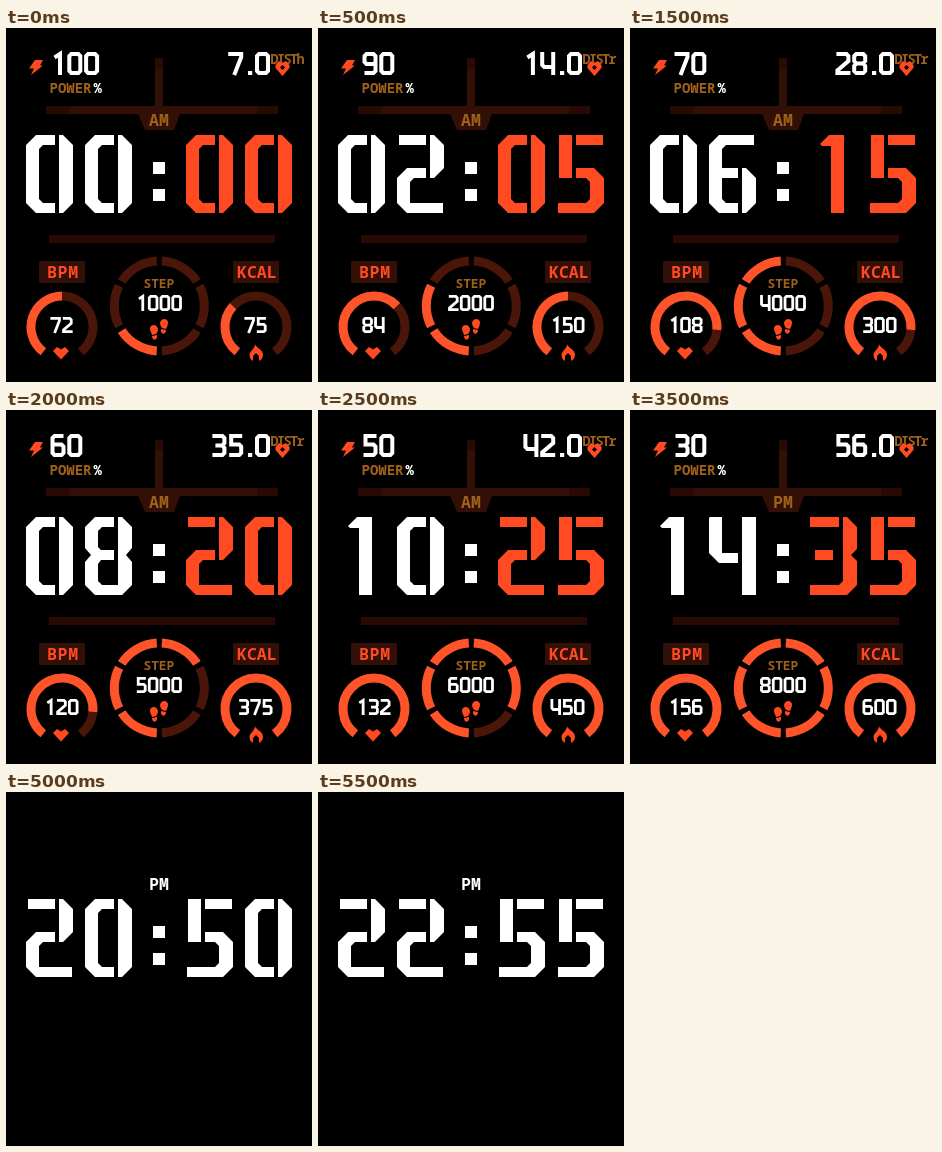
Write an HTML page that moves like this. It is 306 px wide and 354 px high and loops after 6000 ms.

```html
<!DOCTYPE html>
<html lang="en">
<head>
<meta charset="utf-8">
<title>Watch face</title>
<style>
  html, body { margin: 0; width: 100%; height: 100%; overflow: hidden; background: #000; }
  svg { display: block; width: 306px; height: 354px; }
  text { font-family: "Noto Sans Mono", "DejaVu Sans Mono", monospace; font-weight: 600; }
  .hot { fill: #ff4a22; }
  .gold { fill: #a0621a; }
  .bar { fill: #320f07; }
  .edge { fill: #280904; }
  .white { fill: #fff; }
  .arc { fill: none; stroke: #4a1609; }
  .arc.on { stroke: #ff5329; }
  .num { fill: none; stroke: #fff; stroke-width: 4; }
</style>
</head>
<body>
<svg viewBox="0 0 306 354">
  <rect width="306" height="354"/>
  <g id="full">
    <path class="bar" d="M149 30h8v48h115v8H174L168 102H139L132 86H40v-8h109zM33 233h46v22H33zM227 233h46v22H227z"/>
    <path class="edge" d="M40 78h24v8H40zM251 78h21v8H251zM149 30h8v10h-8zM43 207h226v8H43z"/>
    <g class="hot">
      <path d="M29 32H37L34 37.500H37L25 47L28 40.500H23Z"/>
      <text x="41" y="250" font-size="16.500" letter-spacing=".7">BPM</text>
      <text x="231" y="250" font-size="16.500">KCAL</text>
      <path d="M47 323L51 319L55 321.500L59 319L63 323L55 331.500Z"/>
      <path d="M249 316C250 320 257 321 257 327C257 330 255 332 253 333V328L250 325L247 328V333C245 332 243.500 330 243.500 327C243.500 323 249 321 249 316Z"/>
      <path d="M144 300c1-4 7-4 8 1 0 2-1 4-2 5l-4 1c-1-3-2-4-2-7zM146 308l5-1c1 6-5 6-5 1z"/>
      <path d="M154 295c1-5 7-5 8-1 0 3-1 5-2 7l-4-1c-1-2-2-3-2-5zM155 301l5 1c0 5-6 5-5-1z"/>
    </g>
    <text class="gold" x="43.500" y="65" font-size="14">POWER<tspan class="white" x="87.500">%</tspan></text>
    <text class="gold" x="137.500" y="260" font-size="12.800">STEP</text>
    <text class="gold" id="dist" x="264.500" y="36" font-size="13.500" letter-spacing="-1.600"></text>
    <path class="hot" fill-rule="evenodd" d="M269.500 37L273 33L276.500 35L280 33L283.500 37V40L276.500 48L269.500 40ZM276.500 37l-2.500 2.500 2.500 2.500 2.500-2.500z"/>
    <g id="rings"></g>
    <g id="values" class="num"></g>
  </g>
  <text id="half" x="153" y="98" font-size="16.500" text-anchor="middle"></text>
  <path class="white" d="M147 134h12v12h-12zM147 161h12v12h-12z"/>
  <g id="clock"></g>
</svg>
<script>
const $ = id => document.getElementById(id);

// Stencil numerals, 47 x 78
const rightSide = 'M33 0H37L47 10V68L37 78H33Z';
const big = [
  'M10 0H29V10H17L13 14V64L17 68H29V78H10L0 68V10Z' + rightSide,
  'M10 9L19 0H34V78H21V11H12Z',
  'M2 0H29V10H2ZM33 0H37L47 10V33L37 43H33ZM10 33H29V43H17L13 47V68H46V78H10L0 68V43Z',
  'M0 0H29V10H0ZM5 33H23V43H5ZM33 0H37L47 10V32L41 38L47 44V68L37 78H0V68H29L33 64Z',
  'M1 0H13V36H29V46H10L0 36V1ZM33 0H47V78H33Z',
  'M2 0H15V43H2ZM19 0H46V10H19ZM19 33H37L47 43V68L37 78H1V68H29L33 64V47L29 43H19Z',
  'M10 0H45V10H17L13 14V33H29V43H13V64L17 68H29V78H10L0 68V10ZM33 33H37L47 43V68L37 78H33Z',
  'M1 0H29V10H1ZM33 0H47V14L34 42V78H20V40L33 12Z',
  'M10 0H29V10H17L13 14V30L16 33H29V43H16L13 47V64L17 68H33V78H10L0 68V45L6 38L0 31V10Z' +
    'M33 0H37L47 10V31L41 38L47 45V68L37 78H33Z',
  'M10 0H29V10H17L13 14V33H29V43H10L0 33V10ZM33 0H37L47 10V68L37 78H2V68H33Z'
];

// Stroked numerals, 15 x 23
const small = {
  0: 'M4 2H11L13 4V19L11 21H4L2 19V4Z',
  1: 'M4 5.500L9.500 2V23',
  2: 'M1 2H11L13 4V9L2 18.500V21H15',
  3: 'M1 2H11L13 4V9L11 11.500L13 14V19L11 21H1M4 11.500H11',
  4: 'M2 0V13L4 15H13M13 0V23',
  5: 'M14 2H3V10.500H11L13 12.500V19L11 21H1',
  6: 'M13 2H4L2 4V19L4 21H11L13 19V12.500L11 10.500H2',
  7: 'M0 2H13V5L6 23',
  8: 'M4 2H11L13 4V9L11 11.500H4L2 9V4ZM4 11.500H11L13 14V19L11 21H4L2 19V14Z',
  9: 'M2 21H11L13 19V4L11 2H4L2 4V10L4 12H13',
  '.': 'M3 21H7.200'
};
const STEP = 16.800, DOT = 10;
const advance = c => c === '.' ? DOT : STEP;

function number(value, x, y, scale, align) {
  const chars = [...String(value)];
  const width = chars.reduce((sum, c) => sum + advance(c), 0) - 1.800;
  let dx = 0;
  const glyphs = chars.map(c => {
    const g = `<path transform="translate(${dx})" d="${small[c]}"/>`;
    dx += advance(c);
    return g;
  }).join('');
  return `<g transform="translate(${x - width * scale * align} ${y}) scale(${scale})">${glyphs}</g>`;
}

function arc(cx, cy, r, from, to, width, on) {
  const point = deg => {
    const a = deg * Math.PI / 180;
    return `${(cx + r * Math.sin(a)).toFixed(2)} ${(cy - r * Math.cos(a)).toFixed(2)}`;
  };
  const large = to - from > 180 ? 1 : 0;
  return `<path class="arc${on ? ' on' : ''}" stroke-width="${width}" d="M${point(from)}A${r} ${r} 0 ${large} 1 ${point(to)}"/>`;
}

const level = (value, max) => Math.min(6, Math.ceil(value * 6 / max));

function gauge(cx, filled) {
  const start = -143, end = start + 286 * filled / 6;
  return arc(cx, 299, 31, end, 143, 9, false) + arc(cx, 299, 31, start, end, 9, true);
}

function stepRing(filled) {
  let out = '';
  for (let i = 0; i < 6; i++) {
    const a = 180 + i * 60;
    out += arc(153.300, 278, 45, a + 3.200, a + 56.800, 9, i < filled);
  }
  return out;
}

function clock(hours, minutes, dark) {
  const digits = [hours, minutes].map(n => String(n).padStart(2, '0')).join('');
  return [20, 79, 180, 239].map((x, i) =>
    `<path class="${i < 2 || dark ? 'white' : 'hot'}" transform="translate(${x} 107)" d="${big[digits[i]]}"/>`
  ).join('');
}

function draw(n) {
  const dark = n >= 10;
  $('full').style.display = dark ? 'none' : '';
  $('clock').innerHTML = clock(n * 2, n * 5, dark);
  $('half').textContent = n < 6 ? 'AM' : 'PM';
  $('half').setAttribute('class', dark ? 'white' : 'gold');
  if (dark) return;

  const bpm = Math.min(180, 72 + n * 12);
  const kcal = 75 + n * 75;
  const steps = 1000 + n * 1000;
  $('dist').textContent = n ? 'DISTr' : 'DISTh';
  $('rings').innerHTML = gauge(56, level(bpm, 144)) + gauge(250, level(kcal, 400)) + stepRing(level(steps, 8000));
  $('values').innerHTML =
    number(100 - n * 10, 44.500, 24, 1, 0) +
    number((7 + n * 7).toFixed(1), 264, 24, 1, 1) +
    number(bpm, 55.500, 289, .7, .5) +
    number(kcal, 249.500, 289, .7, .5) +
    number(steps, 153, 267, .7, .5);
}

let shown = -1;
function tick() {
  const n = Math.floor(performance.now() % 6000 / 500);
  if (n !== shown) draw(shown = n);
  requestAnimationFrame(tick);
}
tick();
</script>
</body>
</html>
```
